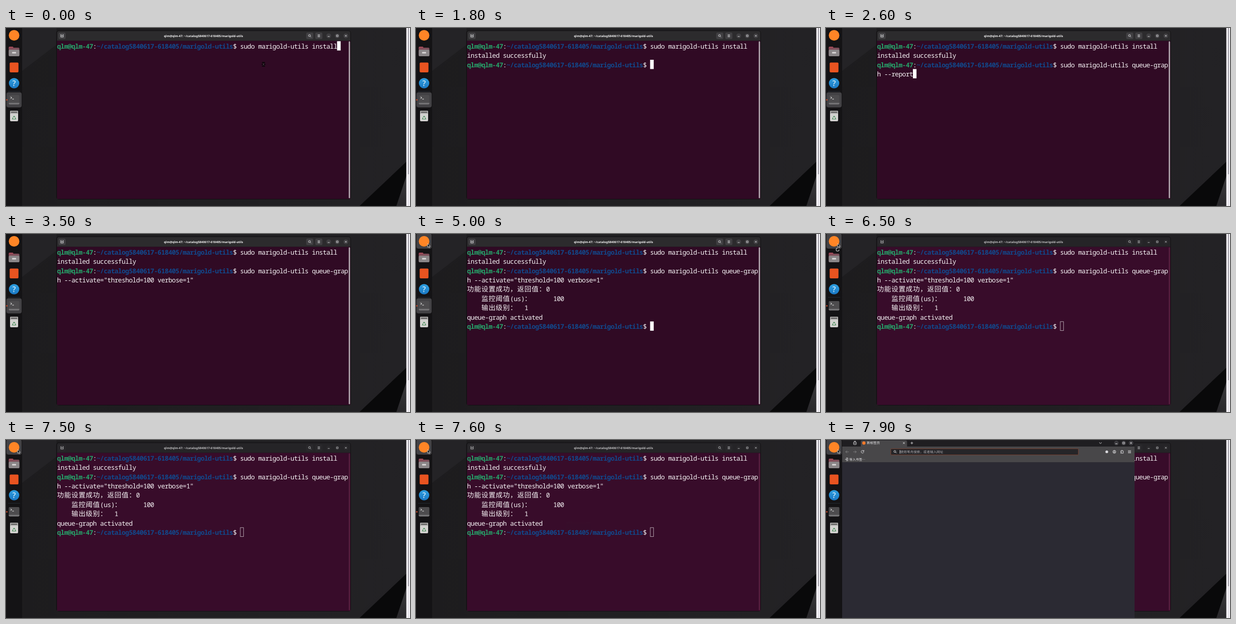
These frames come from a looping animation (800x353 px, 8 s). An HTML page:

```html
<!DOCTYPE html>
<html lang="zh">
<head>
<meta charset="utf-8">
<title>Terminal session</title>
<style>
html, body { margin: 0; width: 100%; height: 100%; overflow: hidden; background: #1d1c1f; }
svg { display: block; width: 800px; height: 353px; }
text { white-space: pre; text-rendering: geometricPrecision; }
.mono { font: 13px "Noto Sans Mono", monospace; letter-spacing: -.69px; fill: #f6f3f5; }
.user { font-weight: 700; fill: #26a269; }
.path { font-weight: 700; fill: #12488b; }
.cjk { font: 13.6px "Noto Sans CJK SC", "Noto Sans CJK", sans-serif; letter-spacing: .62px; fill: #f6f3f5; }
.title { font: 700 5.88px "Noto Sans", sans-serif; text-anchor: middle; }
.ui { font: 6.4px "Noto Sans CJK SC", "Noto Sans CJK", sans-serif; fill: #f0f0f2; }
.icon { fill: none; stroke: #e4e4e6; stroke-width: .9; }
.dim { opacity: .35; }
</style>
</head>
<body>
<svg id="stage" viewBox="0 0 800 353" xmlns="http://www.w3.org/2000/svg">
  <defs>
    <linearGradient id="wall"><stop stop-color="#1d1c1e"/><stop offset="1" stop-color="#232225"/></linearGradient>
    <linearGradient id="sliver" x2="0" y2="1"><stop stop-color="#3a393c"/><stop offset="1" stop-color="#29282b"/></linearGradient>
    <linearGradient id="files" y2="1" x2="1"><stop stop-color="#8b4a56"/><stop offset="1" stop-color="#6a5560"/></linearGradient>
    <linearGradient id="help" x2="0" y2="1"><stop stop-color="#2f9fe0"/><stop offset="1" stop-color="#1a78c4"/></linearGradient>
  </defs>

  <g id="desktop">
    <rect width="800" height="353" fill="url(#wall)"/>
    <path d="M32 0H100V33L32 85Z" fill="#242326"/>
    <path d="M793 265L700 353H793Z" fill="#09090a"/>
    <path d="M793 293L773 353H793Z" fill="url(#sliver)"/>
    <rect x="792.7" width="7.3" height="353" fill="#f4f2f6"/>
    <rect x="796" width="1.6" height="353" fill="#dddae1"/>
    <rect x="796" width="1.6" height="290" fill="#8d8a94"/>
  </g>

  <g id="terminal">
    <rect x="99.5" y="5" width="583.5" height="335" rx="5" fill="#121013"/>
    <path id="head" d="M101 25.5V10Q101 6 105 6H678Q682 6 682 10V25.5Z"/>
    <rect id="screen" x="101" y="25.5" width="581" height="313.5"/>
    <rect id="bar" x="678.7" y="26.5" width="2.6" height="311" rx="1.2"/>
    <g id="buttons"></g>
    <text id="caption" class="title" x="391" y="17.5"></text>
    <g id="lines"></g>
    <rect id="caret" width="7.1" height="18.4"/>
  </g>

  <g id="browser">
    <rect x="32" width="579" height="353" fill="#2b2a33"/>
    <rect x="32" width="579" height="14" fill="#1f1e21"/>
    <rect x="32" y="13" width="579" height="31" fill="#484749"/>
    <path d="M69 13V3Q69 1 71 1H158Q160.5 1 160.5 3V13Z" fill="#484749"/>
    <circle cx="75" cy="6" r="3.2" fill="#ff7a2a"/>
    <text class="ui" x="81" y="8.4">新标签页</text>
    <g class="icon">
      <rect x="54.5" y="4" width="5.5" height="5" rx="1"/><path d="M55.5 2.5H59M56 6.5H58.5"/>
      <path d="M152.5 4.3L156 7.8M156 4.3L152.5 7.8M167.5 6H172.5M170 3.5V8.5M541 4.8L543.5 7.2L546 4.8"/>
    </g>
    <g fill="#3c3b3f"><circle cx="575" cy="6" r="4.6"/><circle cx="589.5" cy="6" r="4.6"/><circle cx="604" cy="6" r="4.6"/></g>
    <path class="icon" d="M573 7.5H577M587.8 4.3H591.2V7.7H587.8ZM602.3 4.3L605.7 7.7M605.7 4.3L602.3 7.7"/>
    <path class="icon dim" d="M45 23.5H39M41.8 20.7L39 23.5L41.8 26.3M54 23.5H60M57.2 20.7L60 23.5L57.2 26.3"/>
    <path class="icon" d="M74.6 21.8A2.7 2.7 0 1 0 75 23.8M75 20V22.4H72.6"/>
    <rect x="128.3" y="17.3" width="371.4" height="12.2" rx="1.5" fill="#262528" stroke="#84432f" stroke-width=".8"/>
    <g class="icon"><circle cx="136.3" cy="22.7" r="1.9"/><path d="M137.7 24.1L139.7 26.1M146.5 20V27"/></g>
    <text class="ui" x="147" y="25.8" style="fill:#aaa9ae;font-size:6.55px">使用苇舟搜索，或者输入网址</text>
    <circle cx="556" cy="23.4" r="2.7" fill="#d8d8dc"/>
    <g class="icon">
      <circle cx="571" cy="23.4" r="2.9"/><circle cx="571" cy="22.5" r=".8"/><path d="M569 25.3Q571 23.6 573 25.3"/>
      <path d="M583.7 21.7H585.2V20.5H587V21.7H588.7V26.2H583.7V24.7H585V23.2H583.7Z"/>
      <path d="M598 21.3H604M598 23.4H604M598 25.5H604"/>
      <path d="M39.8 35.7H43.2V41H39.8M37.8 38.3H41.5M40 36.9L41.5 38.3L40 39.7"/>
    </g>
    <text class="ui" x="46" y="40.7">导入书签…</text>
  </g>

  <g id="dock">
    <rect width="32" height="353" fill="#141315"/>
    <rect id="hotWeb" x="1" y="-1" width="30" height="30" rx="4" fill="#434245"/>
    <rect id="hotTerm" x="1" y="127.5" width="30" height="30" rx="4" fill="#434245"/>
    <circle cx="16" cy="14.5" r="10.5" fill="#ff8526"/>
    <rect x="5.5" y="37" width="9" height="5" rx="1.5" fill="#a64a5a"/>
    <rect x="5.5" y="39" width="21" height="17" rx="2" fill="url(#files)"/>
    <rect x="5.5" y="43" width="21" height="13" rx="2" fill="#8a8688"/>
    <rect x="12" y="47.5" width="8" height="3" rx="1" fill="#d8d5d6"/>
    <rect x="7.3" y="68.5" width="17.4" height="19.5" rx="2" fill="#e95420"/>
    <circle cx="16" cy="109.5" r="10.3" fill="url(#help)"/>
    <text x="16" y="115" text-anchor="middle" fill="#fff" style="font:15px 'Noto Sans',sans-serif">?</text>
    <path d="M4 125.5H28" stroke="#29303a" stroke-width=".8"/>
    <rect x="5.5" y="133" width="21" height="18.5" rx="2" fill="#4d4c4e"/>
    <path d="M5.5 148.5H26.5V149.5Q26.5 151.5 24.5 151.5H7.5Q5.5 151.5 5.5 149.5Z" fill="#777678"/>
    <path d="M9 136.5L11.5 138.3L9 140.1M12.5 141H15.5" fill="none" stroke="#fff" stroke-width="1"/>
    <circle cx="1.8" cy="142.5" r="1.3" fill="#e0522d"/>
    <rect x="8" y="164" width="16" height="21" rx="2" fill="#d3d2d0"/>
    <rect x="8" y="164" width="16" height="6" rx="1.5" fill="#aaa8a7"/>
    <rect x="10" y="166" width="12" height="2" fill="#5b5a5a"/>
    <g id="recycle" fill="none" stroke="#3c8a50" stroke-width="1.3"></g>
    <circle id="ghost" fill="#c0505c"/>
  </g>

  <g id="beam" fill="none" stroke-linecap="round">
    <path d="M-2.2 -3.5H2.2M0 -3.5V3.5M-2.2 3.5H2.2M-3 0H3" stroke="#0a0609" stroke-width="2"/>
    <path d="M0 -1.5V1.5" stroke="#8c7f88" stroke-width=".7"/>
  </g>
  <g id="arrow">
    <path d="M0 0V7.3L1.7 5.8L2.9 8.4L4.2 7.8L3 5.3H5.3Z" fill="#111" stroke="#f2f2f2" stroke-width=".7"/>
    <path id="spin" d="M-3 12A3 3 0 1 1 0 15" fill="none" stroke="#d8d8d8" stroke-width="1"/>
  </g>
</svg>

<script>
const LOOP = 8000, CELL = 7.11, ROW = 18.4;
const BLUR = 5500, OPEN = 7600;
const USER = 'qlm@qlm-47', DIR = '~/catalog5840617-618405/marigold-utils';
const $ = id => document.getElementById(id);
const set = (id, attrs) => { for (const k in attrs) $(id).setAttribute(k, attrs[k]); };
const show = (id, on) => set(id, { visibility: on ? 'visible' : 'hidden' });
const colX = c => 101 + c * CELL;
const clamp = v => Math.max(0, Math.min(1, v));

const run = (col, row, str, kind = 'mono') =>
  `<text class="${kind}" x="${colX(col)}" y="${40.8 + row * ROW}">${str}</text>`;

const prompt = row => run(0, row, USER, 'mono user') + run(10, row, ':') +
  run(11, row, DIR, 'mono path') + run(49, row, '$');

const command = 'sudo marigold-utils ';
const output = run(0, 4, '功能设置成功，返回值：', 'cjk') + run(22, 4, '0') +
  run(4, 5, '监控阈值', 'cjk') + run(12, 5, '(us)') + run(16, 5, '：', 'cjk') + run(24, 5, '100') +
  run(4, 6, '输出级别：', 'cjk') + run(16, 6, '1') +
  run(0, 7, 'queue-graph activated') + prompt(8);

// Terminal contents: from, to, markup
const blocks = [
  [0, LOOP, prompt(0) + run(51, 0, command + 'install')],
  [1800, LOOP, run(0, 1, 'installed successfully') + prompt(2)],
  [2200, 2600, run(51, 2, command + 'install')],
  [2600, LOOP, run(51, 2, command + 'queue-grap')],
  [2600, 3000, run(0, 3, 'h --report')],
  [3000, LOOP, run(0, 3, 'h --activate="threshold=100 verbose=1"')],
  [3700, LOOP, output]
];

// Block caret: from, to, column, row
const carets = [
  [0, 100, 78, 0], [700, 1200, 78, 0], [1200, 1800, 0, 1], [1800, 2200, 51, 2],
  [2200, 2600, 78, 2], [2600, 3000, 10, 3], [3000, 3500, 39, 3],
  [3700, 4300, 51, 8], [4900, LOOP, 51, 8]
];

const during = t => ([from, to]) => t >= from && t < to;

function build() {
  $('caption').textContent = `${USER}: ${DIR}`;
  $('lines').innerHTML = blocks.map(b => `<g>${b[2]}</g>`).join('');
  const square = x => `<rect x="${x - 7}" y="9" width="14" height="13" rx="2.5"/>`;
  const round = x => `<circle cx="${x}" cy="15.5" r="4.8"/>`;
  $('buttons').innerHTML =
    `<g id="pads">${[111, 601.5, 619.5].map(square).join('')}${[639, 656, 673].map(round).join('')}</g>
    <path class="icon" d="M110 13H108.5V18H113.5V13H112M111 14V16.5M109.8 15.3H112.2
      M602.7 16.8L604.2 18.3M617.2 13.5H621.8M617.2 15.5H621.8M617.2 17.5H621.8
      M637.2 16.8H640.8M654.4 13.9H657.6V17.1H654.4ZM671.4 13.9L674.6 17.1M674.6 13.9L671.4 17.1"/>
    <circle class="icon" cx="601" cy="15" r="2"/>`;
  $('recycle').innerHTML = [0, 120, 240].map(a =>
    `<path d="M-1.7 -1.8L0 -3.6L1.9 -1.5" transform="translate(16 178.5) rotate(${a})"/>`).join('');
}

function drawTerminal(t) {
  const focus = t < BLUR;
  set('head', { fill: focus ? '#2c2b2d' : '#252427' });
  set('screen', { fill: focus ? '#300a24' : '#380c2a' });
  set('bar', { fill: focus ? '#b5adb3' : '#57203f' });
  set('caption', { fill: focus ? '#f5f5f5' : '#c2c1c3' });
  set('buttons', { opacity: focus ? 1 : .8 });
  set('pads', { fill: focus ? '#403f42' : '#2b2a2d' });
  blocks.forEach((b, i) => { $('lines').children[i].style.display = during(t)(b) ? '' : 'none'; });

  const c = carets.find(during(t));
  show('caret', c);
  if (!c) return;
  const inset = focus ? 0 : .4;
  set('caret', {
    x: colX(c[2]) + inset, y: 26.2 + c[3] * ROW + inset,
    width: CELL - inset * 2, height: ROW - inset * 2,
    fill: focus ? '#fff' : 'none', stroke: focus ? 'none' : '#cfc5cb', 'stroke-width': .8
  });
}

function drawPointer(t) {
  let x, y;
  if (t < 4300) {
    const p = clamp(t / 400);
    x = 510 - 26 * p;
    y = 72 + 20 * p;
  } else {
    const p = 1 - (1 - clamp((t - 4300) / 700)) ** 2;
    x = 484 - 461 * p;
    y = 92 - 73 * p;
  }
  const seen = t < 1200 || t >= 4300, text = x > 101;
  const at = { transform: `translate(${x} ${y})` };
  set('beam', at);
  set('arrow', at);
  show('beam', seen && text);
  show('arrow', seen && !text);
  show('spin', t >= 6100 && t < 7000);
  set('spin', { transform: `rotate(${t * .36} 0 12)` });
  show('hotWeb', t >= 4300 && x < 31);
  show('hotTerm', t < BLUR);
}

function drawLaunch(t) {
  const p = clamp((t - 5150) / 600), grow = 1 - (1 - p) ** 2;
  show('ghost', p > 0 && p < 1);
  set('ghost', { cx: 16 + 18 * grow, cy: 14.5, r: 10.5 + 19 * grow, opacity: 1.4 * (1 - grow) });

  const q = clamp((t - OPEN) / 200), ease = q < 1 ? 1 - 2 ** (-10 * q) : 1;
  const s = .05 + .95 * ease;
  show('browser', t >= OPEN);
  set('browser', { opacity: ease, transform: `translate(321.5 176.5) scale(${s}) translate(-321.5 -176.5)` });
}

function frame(now) {
  const t = now % LOOP;
  drawTerminal(t);
  drawPointer(t);
  drawLaunch(t);
  requestAnimationFrame(frame);
}

build();
requestAnimationFrame(frame);
</script>
</body>
</html>
```
